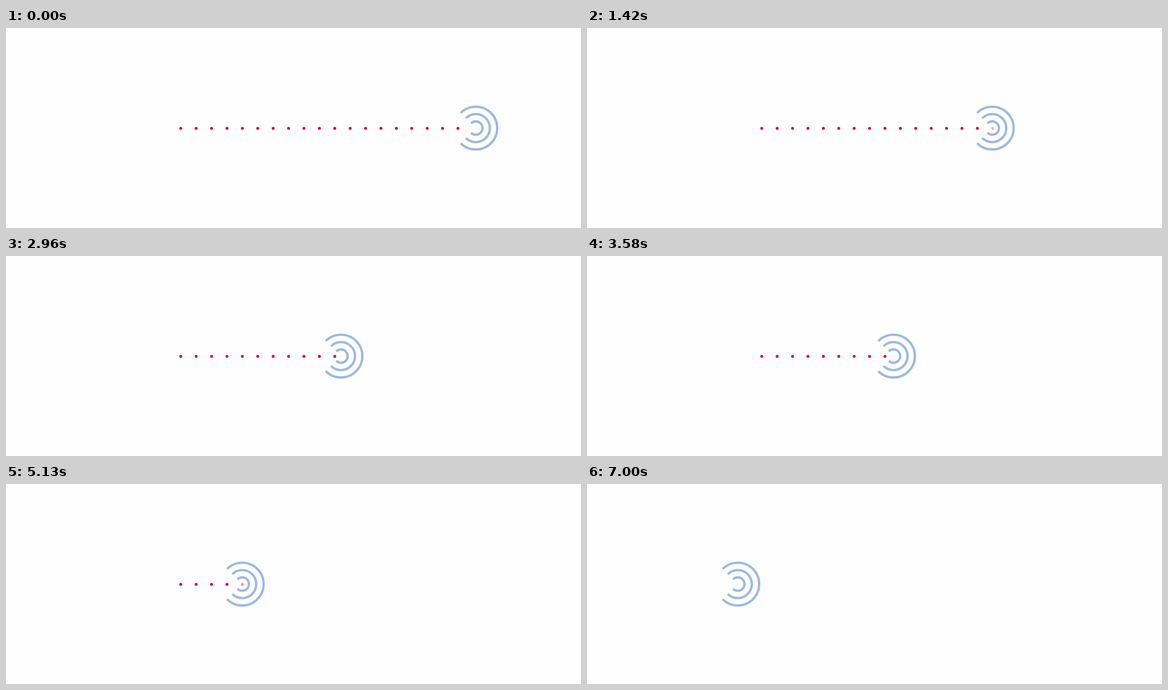
An HTML page with a canvas that plays this animation: 1268x442 px, repeating every 7.04 s.

```html
<!DOCTYPE html>
<html lang="en">
<head>
<meta charset="utf-8">
<title>Signal collecting dots</title>
<style>
html, body { margin: 0; width: 100%; height: 100%; overflow: hidden; background: #fefefe; }
canvas { display: block; }
</style>
</head>
<body>
<canvas id="stage" width="1268" height="442"></canvas>
<script>
const ctx = document.getElementById('stage').getContext('2d');
const LOOP = 7040;
const clamp = v => Math.min(1, Math.max(0, v));

function draw(time) {
  // 24 steps per second, with step times rounded to 10 ms
  const tick = Math.floor((time % LOOP) / 10);
  const step = Math.ceil((tick + 0.5) * 6 / 25) - 1;
  const x = 1036 - step * 4.1875;

  ctx.fillStyle = '#fefefe';
  ctx.fillRect(0, 0, 1268, 442);

  // Each dot fades as the centre of the rings reaches it
  ctx.fillStyle = '#cb124b';
  for (let i = 0; i < 19; i++) {
    const dotX = 385.4 + i * 33.96;
    ctx.globalAlpha = clamp(0.5 + 0.16 * (x - dotX));
    ctx.beginPath();
    ctx.arc(dotX, 221.7, 3.2, 0, Math.PI * 2);
    ctx.fill();
  }

  ctx.globalAlpha = 1;
  ctx.strokeStyle = '#9eb9df';
  ctx.lineWidth = 5.1;
  for (const r of [14.8, 31, 47.2]) {
    ctx.beginPath();
    ctx.arc(x, 221.2, r, -Math.PI * 0.75, Math.PI * 0.75);
    ctx.stroke();
  }
}

const start = performance.now();
function loop() {
  draw(performance.now() - start);
  requestAnimationFrame(loop);
}
loop();
</script>
</body>
</html>
```
